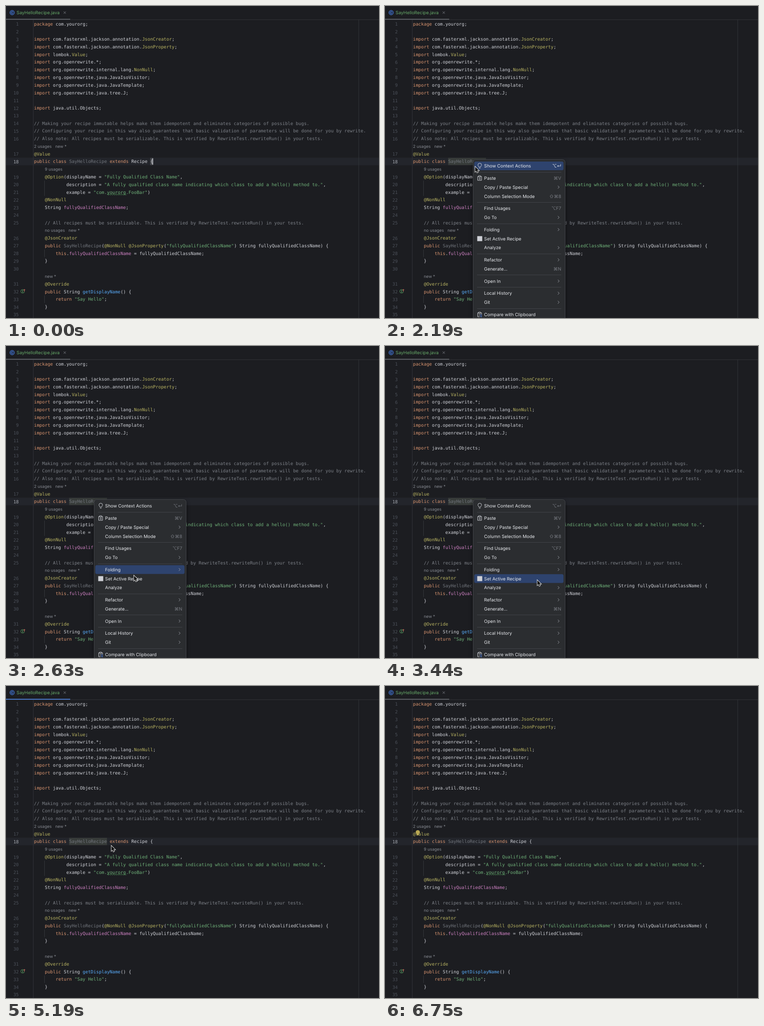
An HTML page with a canvas for the animation above (6.81 s loop, 819 by 684 pixels).

```html
<!DOCTYPE html>
<html lang="en">
<head>
<meta charset="utf-8">
<title>Set active recipe</title>
<style>
html, body { margin: 0; width: 100%; height: 100%; overflow: hidden; background: #1c1d21; }
canvas { display: block; }
</style>
</head>
<body>
<canvas id="stage" width="819" height="684"></canvas>
<script>
const ctx = document.getElementById('stage').getContext('2d');
const LOOP = 6810, PITCH = 16.77, CHAR = 5.935, LEFT = 61.5;
const MONO = '9.859px "DejaVu Sans Mono", monospace';
const UI = '9.87px Inter, sans-serif';
const HINT = '9px Inter, sans-serif';
const KEYS = '10px Inter, "DejaVu Sans", sans-serif';

// Rows starting with "~" are unnumbered inlay hints.
const rows = `package com.yourorg;

import com.fasterxml.jackson.annotation.JsonCreator;
import com.fasterxml.jackson.annotation.JsonProperty;
import lombok.Value;
import org.openrewrite.*;
import org.openrewrite.internal.lang.NonNull;
import org.openrewrite.java.JavaIsoVisitor;
import org.openrewrite.java.JavaTemplate;
import org.openrewrite.java.tree.J;

import java.util.Objects;

// Making your recipe immutable helps make them idempotent and eliminates categories of possible bugs.
// Configuring your recipe in this way also guarantees that basic validation of parameters will be done for you by rewrite.
// Also note: All recipes must be serializable. This is verified by RewriteTest.rewriteRun() in your tests.
~2 usages|new *
@Value
public class SayHelloRecipe extends Recipe {
~    9 usages
    @Option(displayName = "Fully Qualified Class Name",
            description = "A fully qualified class name indicating which class to add a hello() method to.",
            example = "com.yourorg.FooBar")
    @NonNull
    String fullyQualifiedClassName;

    // All recipes must be serializable. This is verified by RewriteTest.rewriteRun() in your tests.
~    no usages|new *
    @JsonCreator
    public SayHelloRecipe(@NonNull @JsonProperty("fullyQualifiedClassName") String fullyQualifiedClassName) {
        this.fullyQualifiedClassName = fullyQualifiedClassName;
    }

~    new *
    @Override
    public String getDisplayName() {
        return "Say Hello";
    }
`.split('\n');

const CLASS_ROW = 18, COMMENT_ROW = 26;
const tokens = new RegExp([
  '(?<comment>//.*)', '(?<string>"[^"]*")',
  '(?<annotation>@\\w+|(?<=\\.)(?:Json\\w+|Value|NonNull)(?=;))',
  '(?<keyword>\\b(?:package|import|public|class|extends|return|this)\\b)',
  '(?<field>(?<=this\\.|String )fully\\w+(?=[; ]))',
  '(?<method>getDisplayName)', '(?<unused>SayHelloRecipe)'
].join('|'), 'g');
const colors = {
  plain: '#d0d2d8', comment: '#7d8188', string: '#6fb179', annotation: '#bab563',
  keyword: '#d8946f', field: '#cf82c3', method: '#59acfa', unused: '#72767d'
};

// label, shortcut (">" opens a submenu), icon; null is a separator
const menu = [
  ['Show Context Actions', '⌥↵', 'bulb'], null,
  ['Paste', '⌘V', 'clip'], ['Copy / Paste Special', '>'], ['Column Selection Mode', '⇧⌘8'], null,
  ['Find Usages', '⌥F7'], ['Go To', '>'], null,
  ['Folding', '>'], ['Set Active Recipe', '', 'square'], ['Analyze', '>'], null,
  ['Refactor', '>'], ['Generate...', '⌘N'], null,
  ['Open In', '>'], null,
  ['Local History', '>'], ['Git', '>'], null,
  ['Compare with Clipboard', '', 'compare']
];

const CLICK = 240, MENU_OPEN = 1500, MENU_CLOSE = 4440, BLUR = 6690;
const cursorPath = [
  [60, 714, 655], [CLICK, 340, 475], [700, 310, 440], [1200, 193, 343], [1810, 193, 343],
  [1880, 198, 352.5], [2190, 198, 352.5], [2630, 281, 503.5], [3060, 334.5, 513.5],
  [4500, 334.5, 513.5], [5130, 231.5, 350.5], [5440, 231.5, 350.5], [6130, 420, -20]
];

const rowY = row => 39 + row * PITCH;
const colX = col => LEFT + col * CHAR;

function text(string, x, y, color, font, align = 'left') {
  ctx.font = font;
  ctx.fillStyle = color;
  ctx.textAlign = align;
  ctx.fillText(string, x, y + 3.6);
}

function rect(x, y, w, h, color) {
  ctx.fillStyle = color;
  ctx.fillRect(x, y, w, h);
}

function stroke(path, color, width = 1) {
  ctx.strokeStyle = color;
  ctx.lineWidth = width;
  ctx.stroke(new Path2D(path));
}

function disc(x, y, r, color) {
  ctx.fillStyle = color;
  ctx.beginPath();
  ctx.arc(x, y, r, 0, 7);
  ctx.fill();
}

function roundBox(x, y, w, h, r, fill, line) {
  ctx.beginPath();
  ctx.roundRect(x, y, w, h, r);
  ctx.fillStyle = fill;
  ctx.fill();
  if (!line) return;
  ctx.strokeStyle = line;
  ctx.lineWidth = 1;
  ctx.stroke();
}

function drawCode(line, y) {
  let end = 0;
  const put = (from, to, kind) => text(line.slice(from, to), colX(from), y, colors[kind], MONO);
  for (const m of line.matchAll(tokens)) {
    put(end, m.index, 'plain');
    end = m.index + m[0].length;
    put(m.index, end, Object.keys(m.groups).find(k => m.groups[k]));
  }
  put(end, line.length, 'plain');
}

function drawHint(row, y) {
  const [usages, fresh] = row.slice(1).split('|');
  const label = usages.trim();
  const x = colX(usages.length - label.length);
  text(label, x, y, '#868a91', HINT);
  if (fresh) text(fresh, x + ctx.measureText(label).width + 8, y, '#868a91', HINT);
}

function drawTab(focused) {
  disc(13.5, 14.5, 5, '#243558');
  stroke('M18.5 14.5a5 5 0 1 1-10 0a5 5 0 1 1 10 0M15.5 13a2.4 2.4 0 1 0 0 3', '#4a7fe0');
  text('SayHelloRecipe.java', 23.3, 14.7, '#66a968', UI);
  stroke('M126.5 12l5 5m0-5l-5 5', '#777a81');
  rect(0, 29.5, 819, 1, '#34363b');
  rect(0, 28, 141, 2, focused ? '#4674c5' : '#595c62');
}

function drawEditor(currentRow) {
  rect(0, rowY(currentRow) - 8.4, 819, PITCH, '#23252b');
  rect(59.5, 30, 1, 654, '#34373c');
  rect(774, 30, 1, 654, '#303338');
  for (const [row, count] of [[21, 2], [30, 1], [36, 1]])
    rect(84, rowY(row) - 8.4, 1, count * PITCH, '#34373c');
}

function drawRows(currentRow) {
  let number = 0;
  rows.forEach((row, i) => {
    const y = rowY(i);
    if (row[0] === '~') return drawHint(row, y);
    text(++number, 28, y + 0.5, i === currentRow ? '#a5a8af' : '#4b5059', MONO, 'right');
    drawCode(row, y);
  });
  let wave = 'M222 413.5';
  for (let i = 0; i < 10; i++) wave += 'q1.05-2.5 2.1 0t2.1 0';
  stroke(wave, '#539a5c', 0.9);
  stroke('M40.5 625.5a4 4 0 1 1-8 0a4 4 0 1 1 8 0M35.5 623.5h2m-1 0v4m-1 0h2', '#579b61');
  stroke('M40.5 626v-5m-1.8 1.8l1.8-1.8l1.8 1.8', '#d0625d');
}

function drawIcon(kind, y) {
  const color = '#ced0d6';
  if (kind === 'bulb')
    stroke(`M206 ${y + 2.5}c0-2-2-2.5-2-4.5a4 4 0 0 1 8 0c0 2-2 2.5-2 4.5zM206.3 ${y + 5}h3.4`, color);
  if (kind === 'clip' || kind === 'compare')
    stroke(`M205.5 ${y - 3.5}h-2v8.5h8.5v-8.5h-2M205.5 ${y - 5}h4.5v2.5h-4.5zM206 ${y}h4m-4 2.5h4`, color);
  if (kind === 'compare') {
    rect(207.5, y, 6, 6, '#2b2d30');
    stroke(`M213 ${y + 1.5}h-4l1.5-1.5m-2 4.5h4l-1.5 1.5`, '#548af7');
  }
  if (kind === 'square') rect(202.5, y - 5.5, 11, 11, color);
}

function drawMenu(selected) {
  ctx.save();
  ctx.shadowColor = '#0009';
  ctx.shadowBlur = 9;
  ctx.shadowOffsetY = 3;
  roundBox(193.5, 336.5, 202, 370, 6, '#2b2d30');
  ctx.restore();
  roundBox(193.5, 336.5, 202, 370, 6, '#2b2d30', '#43454a');
  let y = 350.6;
  for (const item of menu) {
    if (!item) {
      rect(202, Math.round(y - 6.8), 185, 1, '#414348');
      y += 6.75;
      continue;
    }
    const [label, keys, icon] = item, active = label === selected;
    if (active) roundBox(196, y - 9.7, 196, 19.2, 3.5, '#2e436e');
    if (icon) drawIcon(icon, y);
    text(label, 217.6, y, '#e8eaee', UI);
    if (keys === '>') stroke(`M379.5 ${y - 3}l3 3l-3 3`, '#9da0a8');
    else text(keys, 387, y, active ? '#e8eaee' : '#777a81', KEYS, 'right');
    y += 19.88;
  }
}

function drawCursor(t) {
  const next = cursorPath.findIndex(p => p[0] > t);
  if (next < 1) return;
  const [t0, x0, y0] = cursorPath[next - 1], [t1, x1, y1] = cursorPath[next];
  const u = (t - t0) / (t1 - t0), ease = u * u * (3 - 2 * u);
  ctx.save();
  ctx.translate(x0 + (x1 - x0) * ease, y0 + (y1 - y0) * ease);
  if (t < MENU_OPEN) {
    const beam = 'M-2.5-6q2.5 0 2.5 2v8q0 2-2.5 2M2.5-6q-2.5 0-2.5 2v8q0 2 2.5 2M-1.5 2h3';
    stroke(beam, '#111', 2.2);
    stroke(beam, '#e4e4e4', 1);
  } else {
    const arrow = 'M0 0v11l2.5-2.3l1.8 4.1l2-.9l-1.8-3.9h3.6z';
    stroke(arrow, '#f2f2f2', 1.8);
    ctx.fillStyle = '#111';
    ctx.fill(new Path2D(arrow));
  }
  ctx.restore();
}

function drawCaret(t) {
  const blink = since => (t - since) % 1000 < 500;
  const at = (x, row) => rect(x, rowY(row) - 7, 1.5, 14, '#ced0d6');
  if (t < CLICK) at(321.5, CLASS_ROW);
  else if (t < MENU_OPEN) blink(CLICK) && at(339.7, COMMENT_ROW);
  else if (t >= MENU_CLOSE && t < BLUR && blink(MENU_CLOSE)) at(192, CLASS_ROW);
}

function selectedItem(t) {
  if (t < 1810) return '';
  if (t < 2300) return 'Show Context Actions';
  if (t < 2370) return 'Paste';
  if (t < 2420) return 'Copy / Paste Special';
  if (t < 2480) return 'Column Selection Mode';
  if (t < 2540) return 'Find Usages';
  if (t < 2600) return 'Go To';
  return t < 2690 ? 'Folding' : 'Set Active Recipe';
}

function draw(t) {
  const menuOpen = t >= MENU_OPEN && t < MENU_CLOSE;
  const currentRow = t >= CLICK && t < MENU_OPEN ? COMMENT_ROW : CLASS_ROW;
  rect(0, 0, 819, 684, '#1c1d21');
  drawEditor(currentRow);
  drawTab(t >= CLICK && t < BLUR && !menuOpen);
  if (t < CLICK) rect(colX(43), rowY(CLASS_ROW) - 8, CHAR, 16, '#43454a');
  if (t >= MENU_OPEN && t < BLUR) rect(colX(13), rowY(CLASS_ROW) - 8, CHAR * 14, 16, '#373b39');
  drawRows(currentRow);
  drawCaret(t);
  if (t >= BLUR) {
    disc(72, 320.5, 4.6, '#b9a853');
    rect(70, 324, 4, 3, '#b9a853');
  }
  if (menuOpen) drawMenu(selectedItem(t));
  drawCursor(t);
}

ctx.textRendering = 'geometricPrecision';
const start = performance.now();
function tick() {
  draw((performance.now() - start) % LOOP);
  requestAnimationFrame(tick);
}
tick();
</script>
</body>
</html>
```
